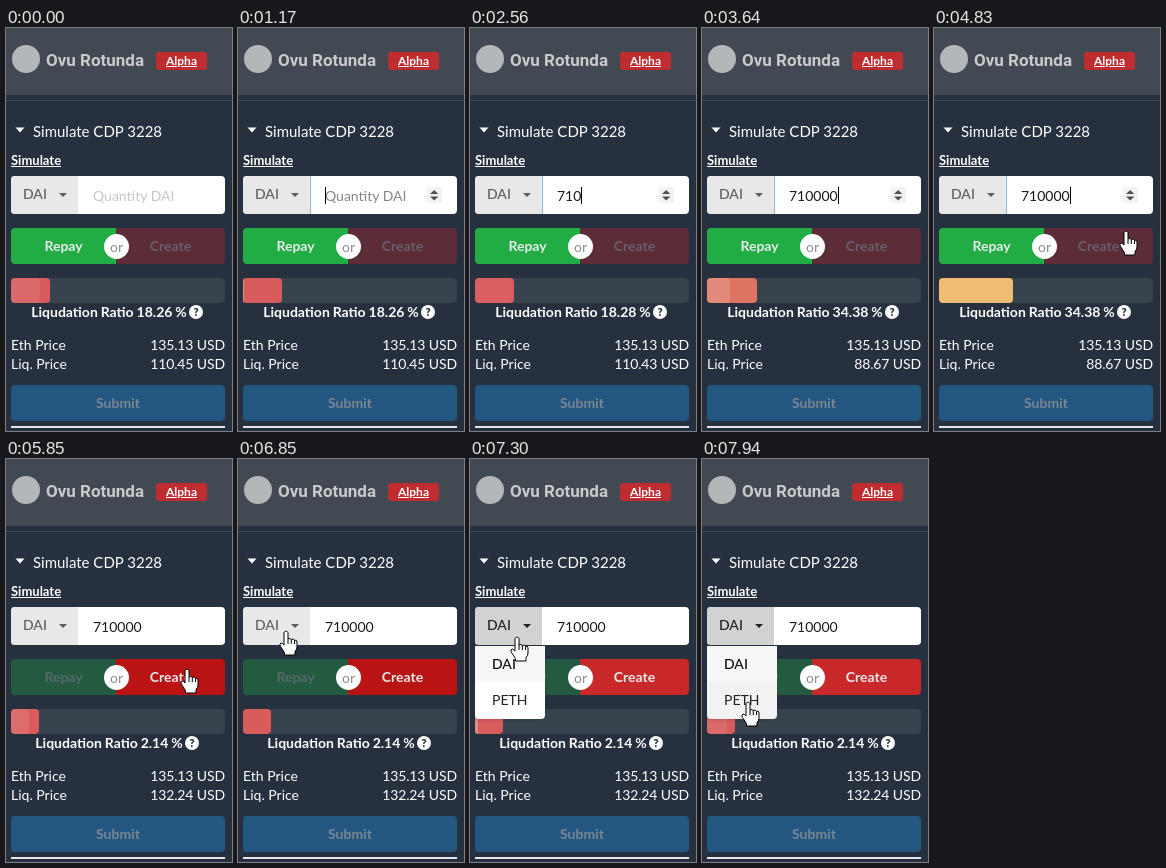
An HTML page that plays this animation: 226 px wide and 403 px high, repeating every 8 s.

```html
<!DOCTYPE html>
<html lang="en">
<head>
<meta charset="utf-8">
<title>CDP simulator</title>
<style>
html, body { margin: 0; width: 100%; height: 100%; overflow: hidden; background: #26303f; }
#stage { position: relative; width: 226px; height: 403px; overflow: hidden; background: #26303f;
  color: #fff; font: 14px/20px Lato, "Open Sans", sans-serif; }
#stage div, #stage svg { position: absolute; }
#stage div { white-space: pre; }
#stage .right { right: 7px; letter-spacing: -.12px; }
.bold { font-weight: 700; }
.box { left: 5px; width: 214px; }
.mid { text-align: center; }

#head { left: 0; top: 0; width: 226px; height: 67px; background: #424953; }
#rule { left: 0; top: 72px; width: 226px; height: 1px; background: #404b58; }
#logo { left: 6px; top: 17px; width: 28px; height: 28px; border-radius: 50%; background: #b4b7ba; }
#name { left: 40px; top: 22px; font: 700 17px/20px Roboto, sans-serif; color: #c8cacc; }
#badge { left: 150px; top: 24px; width: 51px; height: 18px; border-radius: 3px; background: #c02d31;
  font-size: 12px; line-height: 18px; text-decoration: underline; }
#title { left: 27px; top: 93px; font-size: 15px; }
#link { left: 5px; top: 122px; font-size: 13px; text-decoration: underline; }

#field { top: 148px; height: 38px; border-radius: 4px; background: #fff; overflow: hidden; }
#unit { left: 0; top: 0; width: 67px; height: 38px; background: #e8e8e8; color: rgba(0,0,0,.6); font-weight: 500; }
.open #unit { background: #d2d2d3; color: rgba(0,0,0,.85); }
#unit span { position: absolute; left: 12px; top: 8px; }
#unit svg { left: 48px; top: 17px; fill: currentColor; }
#edge { left: 67px; top: 0; width: 1px; height: 38px; background: #85b7d9; }
#hint, #value { left: 82px; top: 10px; }
#hint { color: #c7c7c7; }
.focus #hint { color: #858585; }
#value { color: rgba(0,0,0,.9); }
#caret { top: 11px; width: 1px; height: 17px; background: #000; }
#spin { left: 184px; top: 11px; }
#edge, #spin, #caret { visibility: hidden; }
.focus #edge, .focus #spin, .hover #spin, .blink #caret { visibility: visible; }

.btn { height: 36px; line-height: 36px; top: 200px; font-weight: 700; text-align: center; }
#repay { left: 5px; width: 105px; border-radius: 4px 0 0 4px; background: #21ba45; }
#create { left: 110px; width: 109px; border-radius: 0 4px 4px 0; }
#or { left: 98px; top: 206px; width: 25px; height: 25px; border-radius: 50%; background: #fff;
  color: rgba(0,0,0,.45); line-height: 26px; }

#track { top: 250px; height: 25px; border-radius: 4px; background: #39434e; }
#bar, #shine { left: 0; top: 0; height: 25px; border-radius: 4px; }
#bar { min-width: 28px; }
#shine { background: #fff; }
#ratio { left: 4px; top: 274px; word-spacing: -.5px; }
#stage #ratio svg { position: relative; top: 2px; margin-left: 2px; }
#submit { top: 357px; border-radius: 4px; background: #2185d0; color: #e4f1ff; opacity: .45; }
#foot { top: 398px; height: 2px; background: #e3e5e8; }

#menu { left: 5px; top: 187px; width: 70px; height: 73px; border-radius: 0 0 4px 4px; background: #fff;
  color: rgba(0,0,0,.87); overflow: hidden; box-shadow: 0 2px 3px rgba(34,36,38,.15); visibility: hidden; }
.open #menu { visibility: visible; }
#menu div { left: 0; width: 53px; padding-left: 17px; height: 36px; line-height: 36px; }
#menu .on { background: rgba(0,0,0,.03); color: rgba(0,0,0,.95); font-weight: 500; }
#menu .off { top: 36px; height: 37px; }
.pick #menu .off { background: rgba(0,0,0,.05); }

#mouse { left: 0; top: 0; width: 0; height: 0; }
#mouse svg { left: 0; top: 0; overflow: visible; visibility: hidden; }
.arrow #arrow, .hand #hand, .beam #beam { visibility: visible !important; }
</style>
</head>
<body>
<div id="stage">
  <div id="head"></div><div id="rule"></div>
  <div id="logo"></div>
  <div id="name">Ovu Rotunda</div>
  <div id="badge" class="bold mid">Alpha</div>
  <svg width="10" height="6" style="left:9px;top:99px"><path d="M.5 .5H9.500L5 5.500Z" fill="#fff"/></svg>
  <div id="title">Simulate CDP 3228</div>
  <div id="link" class="bold">Simulate</div>

  <div id="field" class="box">
    <div id="unit"><span>DAI</span><svg width="8" height="5"><path d="M0 0H8L4 4Z"/></svg></div>
    <div id="edge"></div>
    <div id="hint">Quantity DAI</div>
    <div id="value"></div>
    <div id="caret"></div>
    <svg id="spin" width="15" height="16"><rect width="15" height="16" rx="2" fill="#f3f3f3"/><path d="M3 7L7.200 3L11.400 7ZM3 9.500H11.400L7.200 13.500Z" fill="#505050"/></svg>
  </div>

  <div id="repay" class="btn">Repay</div>
  <div id="create" class="btn">Create</div>
  <div id="or" class="mid">or</div>

  <div id="track" class="box"><div id="bar"><div id="shine"></div></div></div>
  <div id="ratio" class="box bold mid">Liqudation Ratio <span id="pct"></span> %<svg width="14" height="14"><circle cx="7" cy="7" r="7" fill="#fff"/><text x="7" y="11" text-anchor="middle" font-family="Lato, sans-serif" font-size="11" font-weight="900" fill="#26303f">?</text></svg></div>

  <div style="left:5px;top:307px">Eth Price</div><div class="right" style="top:307px">135.13 USD</div>
  <div style="left:5px;top:326px">Liq. Price</div><div class="right" style="top:326px"><span id="liq"></span> USD</div>
  <div id="submit" class="box btn">Submit</div>
  <div id="foot" class="box"></div>

  <div id="menu"><div class="on">DAI</div><div class="off">PETH</div></div>

  <div id="mouse">
    <svg id="arrow" width="12" height="19"><path d="M0 0V16L3.700 12.500L6.200 18.300L8.500 17.300L6 11.600H11.200Z" fill="#fff" stroke="#000"/></svg>
    <svg id="hand" width="17" height="25" fill="#fff" stroke="#000" stroke-linejoin="round">
      <path d="M-2 2C-2 -.3 2 -.3 2 2V8Q4 6.500 5.300 8.500Q7.500 7.300 8.500 9.300Q11 8.500 11 11V16Q11 18.500 9 20.500V24H-1.500V21.500L-5.500 15.500Q-7 12.500 -5 12Q-3.500 12 -2 14Z"/>
      <path d="M2 8V13M5.300 8.500V13M8.500 9.500V13" fill="none"/>
    </svg>
    <svg id="beam" width="7" height="16" fill="none" stroke="#333"><path d="M-3 -7.500H-1L.5 -6.500L2 -7.500H4M.5 -6.500V6.500M-3 7.500H-1L.5 6.500L2 7.500H4"/></svg>
  </div>
</div>
<script>
const LOOP = 8000, FOCUS = 1000, CREATE = 5450, OPEN = 7180, BLINK = 530, FADE = 100;
const TEXT = "710000", KEYS = [1990, 2240, 2550, 3050, 3260, 3622];
const PRICE = 135.13, LIQ = 110.453, SLOPE = 21.785 / 710000;
const RED = [217, 92, 92], ORANGE = [239, 188, 114];
const PLAIN = [219, 40, 40], PRESSED = [202, 16, 16];
const PULSE = 2000, PULSE_AT = 1100;
// pointer: time, x, y
const PATH = [
  [0, 170, 420], [400, 180, 290], [600, 184, 218], [700, 185, 190], [850, 186, 169],
  [4640, 208, 188], [4720, 202, 196], [4830, 192, 203], [4970, 193, 208], [5160, 193, 208],
  [5400, 181, 210], [6130, 181, 210], [6300, 165, 207], [6500, 110, 203], [6700, 60, 189],
  [6850, 48, 172], [7160, 48, 172], [7300, 47, 178], [7600, 45, 215], [7870, 45, 238], [7940, 46, 243]
];
// pointer shape from each time on
const SHAPES = [[0, "arrow"], [550, "hand"], [664, "arrow"], [728, "beam"], [1060, ""], [4640, "arrow"], [4760, "hand"]];

const $ = id => document.getElementById(id);
const put = (id, s) => { if ($(id).textContent !== s) $(id).textContent = s; };
const clamp = x => Math.min(1, Math.max(0, x));
const mix = (a, b, k) => a + (b - a) * k;
const blend = (a, b, k) => `rgb(${a.map((v, i) => Math.round(mix(v, b[i], k)))})`;

// the CSS "ease" curve: cubic-bezier(.25, .1, .25, 1)
function ease(x) {
  const at = (a, b, u) => 3 * a * u * (1 - u) ** 2 + 3 * b * u * u * (1 - u) + u ** 3;
  let lo = 0, hi = 1;
  for (let i = 0; i < 24; i++) {
    const u = (lo + hi) / 2;
    if (at(.25, .25, u) < x) lo = u; else hi = u;
  }
  return at(.1, 1, lo);
}
const fade = (t, from) => ease(clamp((t - from) / FADE));

function place(t) {
  const i = PATH.findIndex(p => p[0] > t);
  if (i < 0) return PATH[PATH.length - 1].slice(1);
  const [a, b] = [PATH[i - 1], PATH[i]];
  const k = (t - a[0]) / (b[0] - a[0]);
  return [mix(a[1], b[1], k), mix(a[2], b[2], k)];
}

function liqPrice(t) {
  const value = TEXT.slice(0, KEYS.filter(k => k <= t).length);
  return LIQ + SLOPE * value * (t < CREATE ? -1 : 1);
}
const ratio = t => (1 - liqPrice(t) / PRICE) * 100;

function drawBar(t) {
  const last = [0, ...KEYS, CREATE].filter(k => k <= t).pop();
  const k = fade(t, last);
  const width = r => Math.max(r * 2.14, 28);
  const tone = r => r < 20 ? RED : ORANGE;
  const from = ratio(last - 1), to = ratio(last);
  $("bar").style.width = mix(width(from), width(to), k) + "px";
  $("bar").style.background = blend(tone(from), tone(to), k);
  const pulse = ease((t - PULSE_AT + PULSE) % PULSE / PULSE);
  $("shine").style.width = pulse * 100 + "%";
  $("shine").style.opacity = .3 * (1 - pulse);
}

function drawButton(id, on) {
  $(id).style.opacity = mix(.3, .9, on);
  $(id).style.color = `rgba(255,255,255,${mix(.75, 1, on)})`;
}

function draw(t) {
  const typed = KEYS.filter(k => k <= t).length;
  put("value", TEXT.slice(0, typed));
  put("hint", typed ? "" : "Quantity DAI");
  put("liq", liqPrice(t).toFixed(2));
  put("pct", ratio(t).toFixed(2));
  $("caret").style.left = 82 + $("value").offsetWidth + "px";

  const swap = fade(t, CREATE);
  drawButton("repay", 1 - swap);
  drawButton("create", swap);
  $("create").style.background = blend(PLAIN, PRESSED, swap - fade(t, OPEN));
  drawBar(t);

  const [x, y] = place(t);
  $("mouse").style.left = x + "px";
  $("mouse").style.top = y + "px";

  const focus = t >= FOCUS && t < CREATE;
  const since = t - (typed ? KEYS[typed - 1] : FOCUS);
  const flags = {
    focus,
    hover: t >= 728 && t < FOCUS,
    blink: focus && Math.floor(since / BLINK) % 2 === 0,
    open: t >= OPEN,
    pick: t >= 7800
  };
  const shape = SHAPES.filter(s => s[0] <= t).pop()[1];
  $("stage").className = Object.keys(flags).filter(k => flags[k]).concat(shape).join(" ");
}

let start;
function tick(now) {
  if (start === undefined) start = now;
  draw((now - start) % LOOP);
  requestAnimationFrame(tick);
}
draw(0);
requestAnimationFrame(tick);
</script>
</body>
</html>
```
